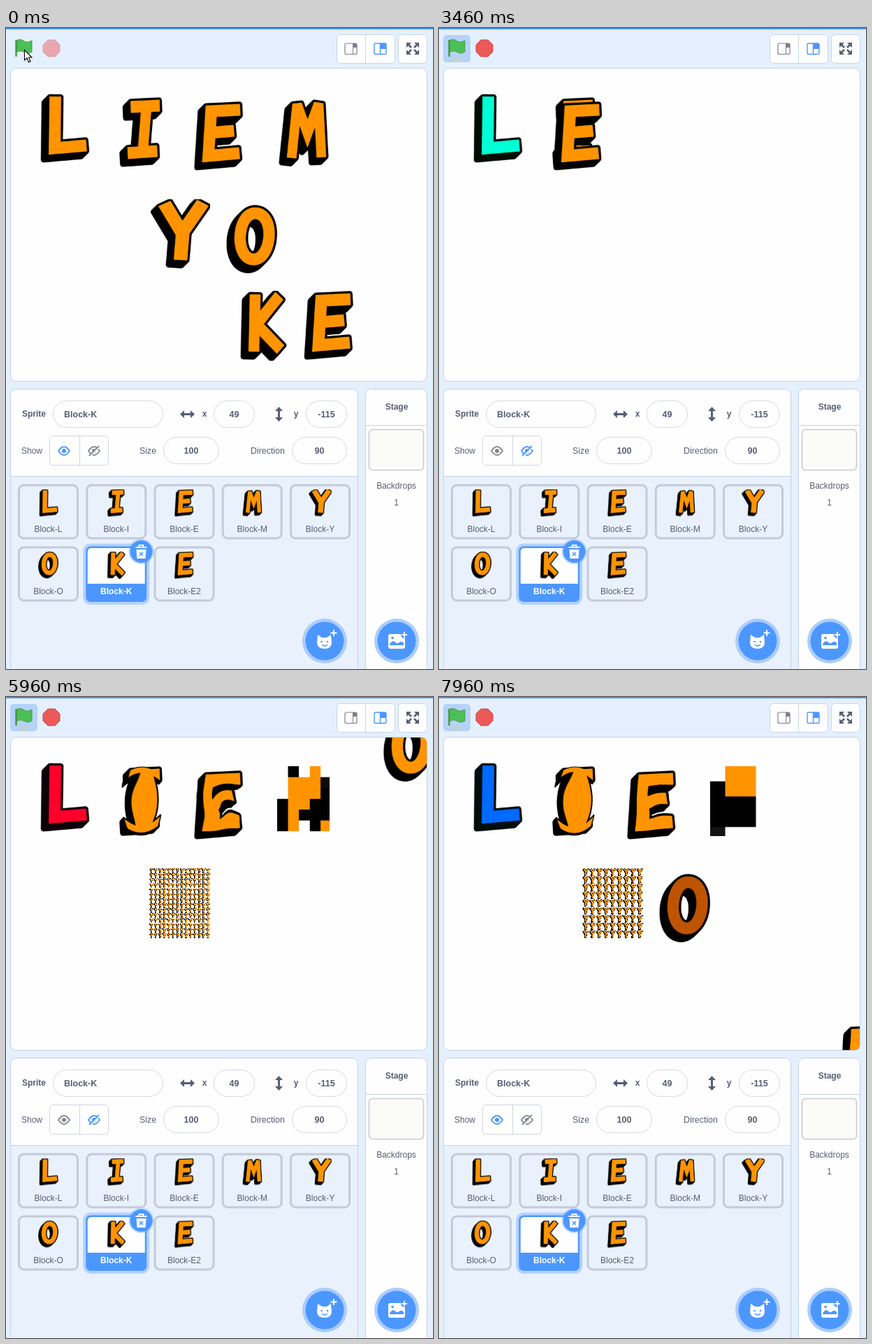
Recreate the animation shown at these times as an HTML page with a canvas. Size 611x917 px, loop 8000 ms.

```html
<!DOCTYPE html>
<html lang="en">
<head>
<meta charset="utf-8">
<title>Block letters</title>
<style>
html, body { margin: 0; width: 100%; height: 100%; overflow: hidden; background: #e5f0fe; }
canvas { display: block; width: 611px; height: 917px; }
</style>
</head>
<body>
<canvas id="view" width="611" height="917"></canvas>
<script>
const ctx = document.getElementById('view').getContext('2d');
const LOOP = 8000, START = 830, GLIDE = 1000, FIRST_GLIDE = 800, TICK = 32.95;
const BLUE = '#4c97ff', INK = '#575e75', LINE = '#c3d1e6', ORANGE = '#ff9400';
const FONT = '"Liberation Sans", Arial, sans-serif';
const SS = 3, H = 100, UNIT = 1.2416;

// Letter centre lines in a 76 x 100 box
const strokes = {
  L: 'M26 5L25 79L71 75',
  I: 'M20 14L68 12M46 13L40 78M15 80L64 77',
  E: 'M69 13L27 15L23 79L68 75M25 46L60 43',
  M: 'M21 87L29 10L44 52L60 9L64 86',
  Y: 'M19 6L41 48L67 5M42 45L39 87',
  O: 'M43 13C74 13 68 79 41 79C12 79 16 13 43 13Z',
  K: 'M26 5L24 87M64 7L28 48L66 84'
};

// Resting place, width, where the glide comes from, effect and its first tick
const sprites = [
  { ch: 'L', x: 45, y: 93, w: 75, dx: 0, dy: -85, fx: 'color', from: 0 },
  { ch: 'I', x: 161, y: 99, w: 66, dx: 0, dy: 390, fx: 'fisheye', from: 30 },
  { ch: 'E', x: 267, y: 104, w: 75, dx: -312, dy: 0, fx: 'whirl', from: 61 },
  { ch: 'M', x: 388, y: 99, w: 75, dx: 192, dy: 0, fx: 'pixelate', from: 91 },
  { ch: 'Y', x: 205, y: 245, w: 87, dx: -253, dy: -268, fx: 'mosaic', from: 122 },
  { ch: 'O', x: 315, y: 252, w: 73, dx: 268, dy: -274, fx: 'bright', from: 152 },
  { ch: 'K', x: 333, y: 376, w: 69, dx: -378, dy: 110, fx: 'ghost', from: 183 },
  { ch: 'E', x: 424, y: 375, w: 76, dx: 175, dy: 111 }
];
const names = ['Block-L', 'Block-I', 'Block-E', 'Block-M', 'Block-Y', 'Block-O', 'Block-K', 'Block-E2'];

function makeCanvas(w, h) {
  const c = document.createElement('canvas');
  c.width = w;
  c.height = h;
  return c;
}

function drawFace(ch, w, color) {
  const c = makeCanvas(w * SS, H * SS), g = c.getContext('2d');
  g.scale(SS * w / 76, SS);
  g.lineWidth = ch === 'M' ? 14 : 17;
  g.miterLimit = 3;
  g.strokeStyle = color;
  g.stroke(new Path2D(strokes[ch]));
  return c;
}

const cache = {};
function letter(ch, w, color = ORANGE, edge = '#000') {
  const key = ch + w + color;
  if (cache[key]) return cache[key];
  const c = makeCanvas(w * SS, H * SS), g = c.getContext('2d');
  const shade = drawFace(ch, w, edge);
  for (let d = 0; d <= 8; d += 0.5) {
    for (let a = 0; a < 16; a++) {
      const q = a * Math.PI / 8;
      g.drawImage(shade, (3.2 * Math.cos(q) - d) * SS, (3.2 * Math.sin(q) + d) * SS);
    }
  }
  g.drawImage(drawFace(ch, w, color), 0, 0);
  return cache[key] = c;
}

// Each map turns a texture point (0..1) into the point to sample
const maps = {
  fisheye(u, v, k) {
    const x = u * 2 - 1, y = v * 2 - 1, len = Math.hypot(x, y) || 1e-6;
    const r = Math.pow(Math.min(len, 1), 1 + k / 4) * Math.max(1, len) / len / 2;
    return [0.5 + r * x, 0.5 + r * y];
  },
  whirl(u, v, k) {
    const x = u - 0.5, y = v - 0.5;
    const f = Math.max(1 - Math.hypot(x, y) * 2, 0);
    const a = -k * 25 * Math.PI / 180 * f * f, s = Math.sin(a), c = Math.cos(a);
    return [c * x + s * y + 0.5, c * y - s * x + 0.5];
  },
  pixelate(u, v, k, w) {
    const nx = w / UNIT / (2.5 * k), ny = H / UNIT / (2.5 * k);
    return [(Math.floor(u * nx) + 0.5) / nx, (Math.floor(v * ny) + 0.5) / ny];
  },
  mosaic(u, v, k) {
    const m = Math.round((k * 25 + 10) / 10);
    return [u * m % 1, v * m % 1];
  }
};

function warp(s, k) {
  const key = s.fx + k;
  if (cache[key]) return cache[key];
  const src = letter(s.ch, s.w), sw = src.width, sh = src.height;
  const from = new Uint32Array(src.getContext('2d').getImageData(0, 0, sw, sh).data.buffer);
  // Mosaic keeps its hard pixels, the others are smoothed when scaled down
  const scale = s.fx === 'mosaic' ? 1 : SS, w = s.w * scale, h = H * scale;
  const c = makeCanvas(w, h), g = c.getContext('2d');
  const img = g.createImageData(w, h), to = new Uint32Array(img.data.buffer);
  for (let y = 0; y < h; y++) {
    for (let x = 0; x < w; x++) {
      const [u, v] = maps[s.fx]((x + 0.5) / w, (y + 0.5) / h, k, s.w);
      if (u >= 0 && u < 1 && v >= 0 && v < 1) {
        to[y * w + x] = from[Math.floor(v * sh) * sw + Math.floor(u * sw)];
      }
    }
  }
  g.putImageData(img, 0, 0);
  return cache[key] = c;
}

// Ten steps up, ten steps down, one tick of rest, held within limits
function level(n, min = 0, max = 250) {
  let v = 0;
  for (let i = 1; i <= n; i++) {
    const r = i % 21;
    if (r) v = Math.max(min, Math.min(max, v + (r <= 10 ? 25 : -25)));
  }
  return v;
}

function lit(rgb, b) {
  return 'rgb(' + rgb.map(v => Math.max(0, Math.min(255, Math.round(v + b * 2.55)))) + ')';
}

function look(s, n) {
  if (!s.fx || n <= 0 || s.fx === 'ghost') return letter(s.ch, s.w);
  if (s.fx === 'color') {
    const turn = n % 8 * 45;
    return letter(s.ch, s.w, `hsl(${(35 + turn) % 360},100%,50%)`, `hsl(${turn},100%,2.7%)`);
  }
  if (s.fx === 'bright') {
    const b = level(n, -100, 100);
    return letter(s.ch, s.w, lit([255, 148, 0], b), lit([0, 0, 0], b));
  }
  const k = level(n) / 25;
  return k ? warp(s, k) : letter(s.ch, s.w);
}

function box(x, y, w, h, r, fill, line, lw = 1) {
  ctx.beginPath();
  ctx.roundRect(x, y, w, h, r);
  if (fill) { ctx.fillStyle = fill; ctx.fill(); }
  if (line) { ctx.strokeStyle = line; ctx.lineWidth = lw; ctx.stroke(); }
}

function shape(d, fill, line, lw = 1) {
  const p = new Path2D(d);
  if (fill) { ctx.fillStyle = fill; ctx.fill(p); }
  if (line) { ctx.strokeStyle = line; ctx.lineWidth = lw; ctx.stroke(p); }
}

function disc(x, y, r, fill) {
  ctx.fillStyle = fill;
  ctx.beginPath();
  ctx.arc(x, y, r, 0, 7);
  ctx.fill();
}

function text(s, x, y, { size = 12, bold = false, align = 'left', color = INK } = {}) {
  ctx.font = `${bold ? 'bold ' : ''}${size}px ${FONT}`;
  ctx.textAlign = align;
  ctx.fillStyle = color;
  ctx.fillText(s, x, y);
}

function field(x, y, w, value) {
  box(x + 0.5, y + 0.5, w - 1, 38, 19, '#fefefe', '#d5d9e0');
  text(value, x + w / 2, y + 24, { size: 12.5, bold: true, align: 'center' });
}

function topBar(t) {
  ctx.fillStyle = BLUE;
  ctx.fillRect(0, 0, 611, 2);
  if (t >= 60) box(6, 10, 39, 39, 5, '#b5d2f8');
  shape('M15 18C20 15 23 17 26 19C30 21 33 20 37 18V34C32 37 29 36 25 34C21 32 18 33 15 35Z', '#4cbf56', '#45993d');
  shape('M14.5 17V41', null, '#45993d', 2.4);
  if (t >= 60) shape('M16 48C15 44 18 44 21 45V40Q23 38 24 41L31 43Q32 46 30 49H18Z', 'rgba(196,208,204,.75)');
  const on = t >= START;
  shape('M60 17H70L77 24V34L70 41H60L53 34V24Z', on ? '#ec5959' : '#e8a6af', on ? '#c9484b' : '#d9a0aa');

  box(473.5, 9.5, 83, 41, 5, '#fefefe', '#c9d5e5');
  shape('M514.5 10V50', null, '#c9d5e5');
  box(485, 22, 17, 15.5, 2, '#fefefe', '#7c8089', 1.2);
  shape('M496.5 22V37.5', null, '#7c8089');
  shape('M496.5 22H502V28H496.5Z', '#7c8089');
  box(527, 22, 17, 15.5, 2, '#fefefe', BLUE, 1.4);
  shape('M535.5 22V37.5', null, BLUE, 1.4);
  shape('M535.5 22H544V30H535.5Z', BLUE);
  box(561.5, 9.5, 41, 41, 5, '#fefefe', '#c9d5e5');
  shape('M573 21H580L573 28ZM591 21V28L584 21ZM573 38V31L580 38ZM591 38H584L591 31Z', INK);
  shape('M575 23L580 28M589 23L584 28M575 36L580 31M589 36L584 31', null, INK, 2.6);
  if (t < 600) shape('M26.5 31.5V46L30 43L32.5 49L35 48L32.5 42H37Z', '#fff', '#000', 1.1);
}

function eye(x, y, color, crossed) {
  shape(`M${x - 8} ${y}Q${x} ${y - 12} ${x + 8} ${y}Q${x} ${y + 12} ${x - 8} ${y}Z`, null, color, 1.8);
  disc(x, y, 3, color);
  if (crossed) {
    shape(`M${x - 6} ${y + 8}L${x + 8} ${y - 6}`, null, '#fefefe', 2);
    shape(`M${x - 7} ${y + 7}L${x + 7} ${y - 7}`, null, color, 1.8);
  }
}

function infoPanel(t) {
  const left = Math.max(0, 1 - (t - 6800) / GLIDE);
  const gliding = t >= 6800;
  const shown = t < START || gliding;
  box(6.5, 516.5, 497, 420, 8, '#e9f1fd', LINE);
  box(7, 517, 496, 124, [8, 8, 0, 0], '#fefefe');
  shape('M7 641.5H503', null, LINE);

  text('Sprite', 23, 556, { bold: true });
  box(67.5, 533.5, 157, 38, 19, '#fefefe', '#d5d9e0');
  text('Block-K', 83, 556.5, { size: 12.5, bold: true });
  shape('M249 552.5L255 547V551H264V547L270 552.5L264 558V554H255V558Z', INK);
  text('x', 284, 556, { bold: true, align: 'center' });
  field(297, 533, 59, Math.round(49 - (gliding ? 304.5 * left : 0)));
  shape('M390.5 542L396 548H392V557H396L390.5 563L385 557H389V548H385Z', INK);
  text('y', 415, 556, { bold: true, align: 'center' });
  field(429, 533, 59, Math.round(-115 - (gliding ? 89 * left : 0)));

  text('Show', 22, 609);
  box(62.5, 583.5, 84, 42, 5, '#fefefe', '#d0d5dd');
  shape('M105.5 584V625', null, '#d0d5dd');
  eye(83, 605, shown ? BLUE : '#858a90', false);
  eye(126, 605, shown ? '#858a90' : BLUE, true);
  text('Size', 191, 609, { size: 12.4 });
  field(225, 585, 80, 100);
  text('Direction', 350, 609, { size: 12.4 });
  field(409, 585, 79, 90);
}

function tiles() {
  sprites.forEach((s, i) => {
    const x = 17 + i % 5 * 97.25, y = i < 5 ? 652.5 : 741.5, chosen = i === 6;
    if (chosen) {
      box(x - 4, y - 4, 95, 87.5, 11, '#b3d2ff');
      box(x, y, 87, 79.5, 7, BLUE);
      box(x + 2.5, y + 2.5, 82, 51, [5, 5, 0, 0], '#fefefe');
    } else {
      box(x + 1.5, y + 1.5, 84, 76, 7, '#e9f1fd', '#c3cbda', 3);
    }
    const w = s.w * 0.39;
    ctx.drawImage(letter(s.ch, s.w), x + 43.5 - w / 2, y + 7, w, 39);
    text(names[i], x + 43.5, y + 68.5, { align: 'center', bold: chosen, color: chosen ? '#fff' : INK });
  });
  disc(193.5, 749, 18, 'rgba(76,151,255,.35)');
  disc(193.5, 749, 16, BLUE);
  shape('M185.5 743H201.5M190.5 742V740H196.5V742', null, '#fff', 1.8);
  shape('M186.5 746H200.5L199.5 759H187.5Z', '#fff');
  shape('M191 750L196 755M196 750L191 755', null, BLUE, 1.6);
}

function roundButton(x) {
  disc(x, 877, 32, '#abcdfc');
  disc(x, 877, 27.5, BLUE);
}

function sidePanel() {
  box(514.5, 516.5, 88, 420, 8, '#fefefe', LINE);
  shape('M515 568.5H602', null, LINE);
  text('Stage', 559, 546, { bold: true, align: 'center' });
  box(519.5, 574.5, 78, 58, 5, '#fbfbfa', '#c9cbd0', 1.6);
  text('Backdrops', 558.5, 659, { align: 'center' });
  text('1', 558.5, 683, { align: 'center' });

  roundButton(456);
  shape('M446 868L452 872H459L465 868L466 880Q465 888 456 888Q446 888 445 880Z', '#fff');
  disc(451.5, 878, 1.3, BLUE);
  disc(460, 878, 1.3, BLUE);
  shape('M452 882Q456 886 460 882', null, BLUE, 1.3);
  shape('M469 861V870M464.5 865.5H473.5', null, '#fff', 2);

  roundButton(559);
  box(547, 867, 24, 21, 3, '#fff');
  shape('M549 882C553 874 556 878 559 880C562 882 564 874 569 880V883H549Z', BLUE);
  disc(553, 872.5, 1.8, BLUE);
  disc(570, 868, 5, BLUE);
  shape('M570 864V872M566 868H574', null, '#fff', 2);
}

function stage(t) {
  box(6.5, 57.5, 596, 448, 8, '#fefefe', LINE);
  ctx.save();
  ctx.beginPath();
  ctx.roundRect(7, 58, 595, 447, 7);
  ctx.clip();
  const tick = Math.floor(15.06 + (t - 2260) / TICK);
  sprites.forEach((s, i) => {
    const p = (t - FIRST_GLIDE - i * GLIDE) / GLIDE;
    if (t >= START && p < 0) return;
    const left = t < START ? 0 : Math.max(0, 1 - p);
    const n = left ? 0 : tick - s.from;
    ctx.globalAlpha = s.fx === 'ghost' ? 1 - level(n, 0, 100) / 100 : 1;
    ctx.drawImage(look(s, n), s.x + s.dx * left, s.y + s.dy * left, s.w, H);
  });
  ctx.restore();
}

function draw(t) {
  ctx.fillStyle = '#e5f0fe';
  ctx.fillRect(0, 0, 611, 917);
  topBar(t);
  stage(t);
  infoPanel(t);
  tiles();
  sidePanel();
}

ctx.imageSmoothingQuality = 'high';
const began = performance.now();
function frame() {
  draw((performance.now() - began) % LOOP);
  requestAnimationFrame(frame);
}
frame();
</script>
</body>
</html>
```
